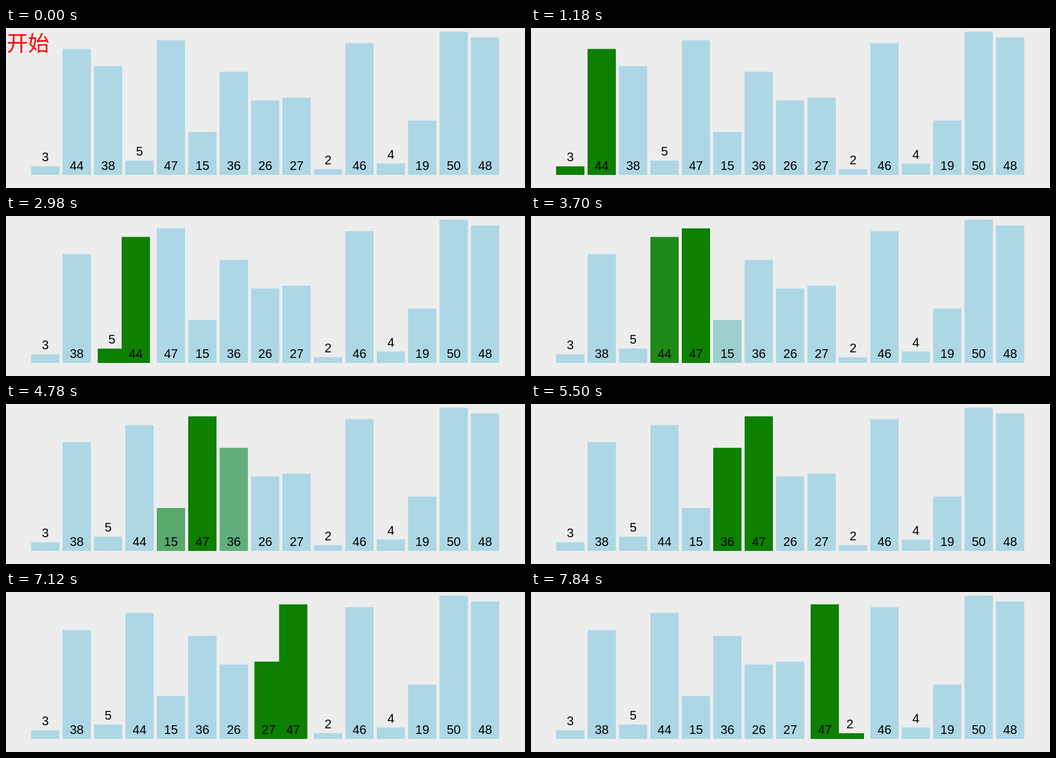
An HTML page for the animation above (8000 ms loop, 826x257 px).

```html
<!DOCTYPE html>
<html lang="zh">
<head>
<meta charset="utf-8">
<title>冒泡排序</title>
<style>
  html, body { margin: 0; width: 100%; height: 100%; overflow: hidden; background: #ededed; }
  svg { display: block; }
  .label { font: 20px "Liberation Sans", Arial, sans-serif; text-anchor: middle; }
  .title { font: 34px "Noto Sans CJK SC", "Noto Sans CJK", sans-serif; fill: #f00; }
</style>
</head>
<body>
<svg id="stage" width="826" height="257" viewBox="0 0 826 257">
  <text id="title" class="title" x="1" y="37">开始</text>
</svg>
<script>
const LOOP = 8000, INTRO = 1000, TICK = 180;
const FADE = 300, SWAP = 400;
const LEFT = 40, PITCH = 50, WIDTH = 45, BASE = 236, UNIT = 4.6;
const IDLE = [174, 215, 230], ACTIVE = [13, 128, 0];
const values = [3, 44, 38, 5, 47, 15, 36, 26, 27, 2, 46, 4, 19, 50, 48];

// One entry per comparison: start of the highlight, start of the swap if any
const steps = [
  [910], [1380, 1705], [2170, 2704], [3110], [3610, 4110],
  [4633, 5050], [5480, 5850], [6330, 6840], [7270, 7723]
].map(([fade, swap]) => ({ fade, swap }));

// Run the first pass of the sort to learn which bars meet in each step
const order = values.map((_, i) => i);
steps.forEach((step, k) => {
  step.pair = [order[k], order[k + 1]];
  if (step.swap) [order[k], order[k + 1]] = [order[k + 1], order[k]];
});

const stage = document.getElementById('stage');
const title = document.getElementById('title');

function add(parent, tag, attrs) {
  const el = document.createElementNS('http://www.w3.org/2000/svg', tag);
  for (const key in attrs) el.setAttribute(key, attrs[key]);
  return parent.appendChild(el);
}

const bars = values.map(v => {
  const group = add(stage, 'g');
  const height = v * UNIT, top = BASE - height;
  const rect = add(group, 'rect', { y: top, width: WIDTH, height });
  const y = v > 5 ? 228 : top - 8;
  add(group, 'text', { class: 'label', x: WIDTH / 2, y }).textContent = v;
  return { group, rect };
});

function ease(t) {
  t = Math.min(1, Math.max(0, t));
  return t < 0.5 ? 4 * t ** 3 : 1 - 4 * (1 - t) ** 3;
}

const mix = p => `rgb(${IDLE.map((c, i) => Math.round(c + (ACTIVE[i] - c) * p))})`;

function draw(t) {
  title.style.display = t < INTRO ? '' : 'none';
  const slots = values.map((_, i) => i);
  const glow = values.map(() => 0);
  for (const { fade, swap, pair } of steps) {
    if (t < fade) break;
    const p = ease((t - fade) / FADE);
    glow.forEach((g, i) => { glow[i] = g + (pair.includes(i) - g) * p; });
    if (swap) {
      const shift = ease((t - swap) / SWAP);
      slots[pair[0]] += shift;
      slots[pair[1]] -= shift;
    }
  }
  bars.forEach(({ group, rect }, i) => {
    group.setAttribute('transform', `translate(${LEFT + PITCH * slots[i]} 0)`);
    rect.setAttribute('fill', mix(glow[i]));
  });
}

const start = performance.now();

function frame() {
  const t = Math.max(0, performance.now() - start) % LOOP;
  draw(t < INTRO ? 0 : INTRO + Math.floor((t - INTRO) / TICK) * TICK);
  requestAnimationFrame(frame);
}
frame();
</script>
</body>
</html>
```
